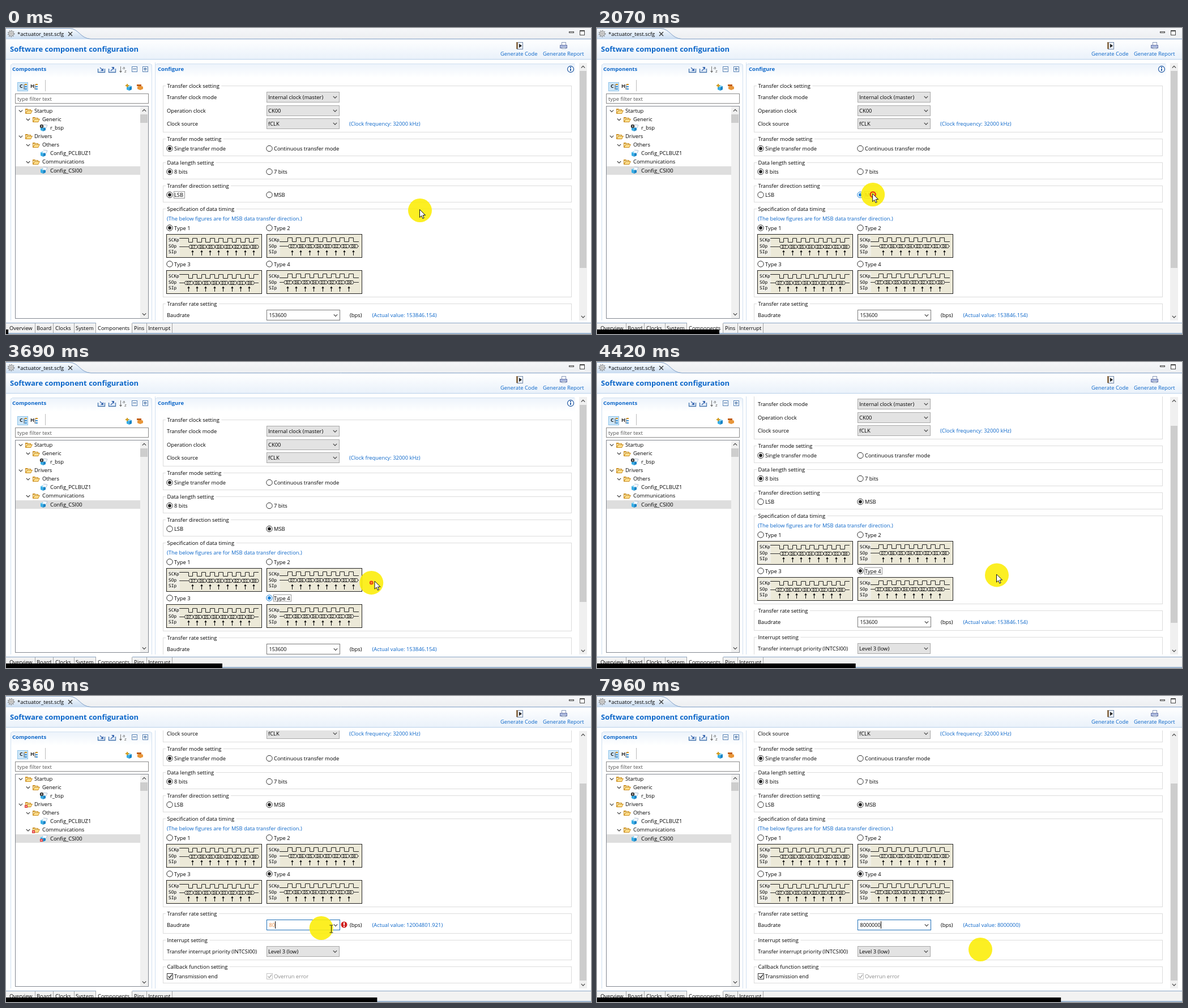
Write an HTML page with a canvas that moves like this. It is 1033 by 542 pixels and loops after 8 s.

```html
<!DOCTYPE html>
<html lang="en">
<head>
<meta charset="utf-8">
<title>Software component configuration</title>
<style>
html, body { margin: 0; width: 100%; height: 100%; overflow: hidden; background: #fff; }
canvas { display: block; }
</style>
</head>
<body>
<canvas id="stage" width="1033" height="542"></canvas>
<script>
const g = document.getElementById('stage').getContext('2d');
const LOOP = 8000, SCROLL = 103;
const SANS = '"Open Sans", "Noto Sans", sans-serif';
const MONO = '"DejaVu Sans Mono", monospace';
const BLUE = '#0b66c9', INK = '#000';

// Pointer path: time, x, y
const PATH = [
  [0, 731, 323], [400, 731, 323], [840, 712, 308], [1040, 597, 292], [1100, 560, 291],
  [1300, 522, 292], [1680, 515, 296], [1740, 488, 295], [2150, 487, 295], [2500, 506, 311],
  [2900, 500, 380], [3250, 487, 418], [3420, 488, 418], [3560, 560, 405], [3690, 645, 391],
  [3730, 655, 389], [3950, 706, 376], [4600, 706, 378], [5010, 578, 400], [5090, 509, 405],
  [5230, 509, 405], [5450, 447, 406], [6200, 460, 409], [6360, 556, 411], [6400, 584, 412],
  [6500, 610, 412], [6680, 612, 412], [7000, 677, 449]
];
const PRESSES = [[1740, 1830], [3320, 3410], [5090, 5500]];
const KEYS = [6050, 6280, 6600, 6760, 6900, 7040, 7190];

function pointer(t) {
  const i = PATH.findIndex(p => p[0] > t);
  if (i < 0) return PATH[PATH.length - 1].slice(1);
  const [t0, x0, y0] = PATH[i - 1], [t1, x1, y1] = PATH[i];
  const k = (t - t0) / (t1 - t0);
  return [x0 + (x1 - x0) * k, y0 + (y1 - y0) * k];
}

function text(s, x, yc, color = INK, size = 9.4, weight = 400, family = SANS) {
  g.font = `${weight} ${size}px ${family}`;
  g.fillStyle = color;
  g.fillText(s, x, yc + size * 0.355);
}
function rect(x, y, w, h, fill, stroke) {
  if (fill) { g.fillStyle = fill; g.fillRect(x, y, w, h); }
  if (stroke) { g.strokeStyle = stroke; g.lineWidth = 1; g.strokeRect(x + .5, y + .5, w - 1, h - 1); }
}
function line(color, width, ...pts) {
  g.strokeStyle = color;
  g.lineWidth = width;
  g.beginPath();
  for (let i = 0; i < pts.length; i += 2) g.lineTo(pts[i], pts[i + 1]);
  g.stroke();
}
function poly(fill, ...pts) {
  g.fillStyle = fill;
  g.beginPath();
  for (let i = 0; i < pts.length; i += 2) g.lineTo(pts[i], pts[i + 1]);
  g.closePath();
  g.fill();
}
function disc(x, y, r, fill, stroke, width = 1) {
  g.beginPath();
  g.arc(x, y, r, 0, 7);
  if (fill) { g.fillStyle = fill; g.fill(); }
  if (stroke) { g.strokeStyle = stroke; g.lineWidth = width; g.stroke(); }
}
function fade(x, y, w, h, from, to) {
  const f = g.createLinearGradient(0, y, 0, y + h);
  f.addColorStop(0, from);
  f.addColorStop(1, to);
  rect(x, y, w, h, f);
}
function chevron(x, y, d = 1, color = '#444', s = 3.2) {
  line(color, 1.2, x - s, y - d * s / 2, x, y + d * s / 2, x + s, y - d * s / 2);
}
function dotted(x, y, w, h) {
  g.setLineDash([1, 1]);
  rect(x, y, w, h, null, '#333');
  g.setLineDash([]);
}

function frame() {
  rect(0, 0, 1033, 542, '#fff');
  fade(0, 0, 1033, 19, '#f6f7f9', '#eceef1');
  // editor tab
  const f = g.createLinearGradient(0, 0, 0, 20);
  f.addColorStop(0, '#fdfeff');
  f.addColorStop(1, '#c9dcf1');
  g.beginPath();
  g.moveTo(0, 20); g.lineTo(0, 1); g.lineTo(112, 1);
  g.bezierCurveTo(130, 2, 130, 18, 150, 19.5);
  g.lineTo(150, 20);
  g.fillStyle = f; g.fill();
  g.beginPath();
  g.moveTo(0, .5); g.lineTo(112, .5);
  g.bezierCurveTo(130, 2, 130, 18, 150, 19.5);
  g.lineTo(1033, 19.5);
  g.strokeStyle = '#7f9fc6'; g.lineWidth = 1; g.stroke();
  disc(9, 10, 4, '#e8e8e8', '#888', 1.2);
  g.setLineDash([1.8, 1.9]);
  disc(9, 10, 5.6, null, '#888', 1.4);
  g.setLineDash([]);
  disc(9, 10, 1.5, '#fff', '#888');
  text('*actuator_test.scfg', 20, 10.5);
  line('#333', 1.2, 110, 7, 117, 14);
  line('#333', 1.2, 117, 7, 110, 14);
  rect(994, 6, 9, 3, '#fff', '#444');
  rect(1013, 4, 9, 9, '#fff', '#444');
  rect(1013, 4, 9, 2, '#444');

  // title band
  fade(0, 20, 1033, 36, '#ffffff', '#e9f1fa');
  rect(0, 55, 1033, 1, '#b9d1ea');
  text('Software component configuration', 7, 37, BLUE, 13, 700);
  text('Generate Code', 873, 45.5, BLUE);
  text('Generate Report', 948, 45.5, BLUE);
  rect(902, 25, 11, 13, '#eef3fa', '#7186a6');
  rect(901, 25, 3, 12, '#8b6f4e');
  poly('#222', 906, 28, 911, 31.5, 906, 35);
  rect(981, 25, 8, 6, '#fff', '#8797b8');
  rect(978, 30, 13, 6, '#aebbe0', '#6674a8');
  rect(981, 34, 8, 3, '#fff', '#8797b8');

  // bottom tabs
  rect(0, 518, 1033, 24, '#fff');
  rect(0, 522, 1033, 18, '#f2f2f2');
  rect(0, 522, 1033, 1, '#8aa6c6');
  rect(0, 540, 1033, 2, '#9db6d2');
  rect(159, 522, 64, 18, '#fff');
  const tabs = [['Overview', 6, 51], ['Board', 54, 83], ['Clocks', 87, 120], ['System', 123, 158],
    ['Components', 162, 222], ['Pins', 226, 248], ['Interrupt', 251, 293]];
  for (const [s, x, end] of tabs) {
    text(s, x, 531.5);
    rect(end, 523, 1, 17, '#a5a5a5');
  }
}

function folder(x, y, bad) {
  poly('#c98c1e', x, y - 4, x + 4, y - 4, x + 5, y - 3, x + 10, y - 3, x + 10, y + 4, x, y + 4);
  poly('#fff3c4', x + 1, y - 2, x + 9, y - 2, x + 9, y + 3, x + 1, y + 3);
  poly('#c98c1e', x, y + 5, x + 3, y - 1, x + 13, y - 1, x + 10, y + 5);
  poly('#ffdf8c', x + 1.6, y + 4, x + 3.7, y, x + 11.5, y, x + 9.5, y + 4);
  if (bad) badge(x, y);
}
function badge(x, y) {
  rect(x - 1, y + 1, 5, 5, '#dd2b2b');
  line('#fff', .9, x, y + 2, x + 3, y + 5);
  line('#fff', .9, x + 3, y + 2, x, y + 5);
}
function cube(x, y) {
  poly('#8fd6f5', x + 1, y - 2, x + 5.5, y - 4, x + 10, y - 2, x + 5.5, y);
  poly('#35ade6', x + 1, y - 2, x + 5.5, y, x + 5.5, y + 6, x + 1, y + 4);
  poly('#1583c6', x + 10, y - 2, x + 5.5, y, x + 5.5, y + 6, x + 10, y + 4);
}
function leaf(x, y) {
  cube(x, y);
  poly('#f4f7fb', x + 6, y - 6, x + 13, y - 5, x + 11, y, x + 5, y - 1);
  line('#9aaec4', .7, x + 6, y - 6, x + 13, y - 5, x + 11, y);
}

function side(bad) {
  rect(0, 56, 263, 462, '#fff');
  fade(8, 64, 250, 24, '#edf3fb', '#ffffff');
  line('#cfdff0', 1, 8.5, 518, 8.5, 66, 11, 63.5, 255, 63.5, 257.5, 66, 257.5, 518);
  text('Components', 11, 73, BLUE, 9.5, 700);
  for (const [x, d] of [[162, 1], [181, -1]]) {
    rect(x, 73, 13, 6, '#e4edf8');
    line('#4676ae', 1.3, x + .5, 72, x + .5, 78.5, x + 12.5, 78.5, x + 12.5, 72);
    line('#3a68b0', 1.3, x + 4, 73 - d * 3, x + 9, 73 + d * 2);
    if (d > 0) poly('#3a68b0', x + 10, 76, x + 10, 71, x + 5, 76);
    else poly('#3a68b0', x + 10, 69, x + 10, 74, x + 5, 69);
  }
  line('#777', 1, 202.5, 68, 202.5, 78);
  poly('#777', 200, 76, 205, 76, 202.5, 79.5);
  text('a', 206, 70, '#555', 7.5);
  text('z', 209, 76, '#555', 8);
  for (const x of [222, 241]) {
    rect(x, 68, 10, 10, '#f4f9ff', '#5b84b5');
    rect(x + 2, 72, 6, 1, '#2d5c96');
  }
  rect(245, 70, 1, 6, '#2d5c96');

  rect(20, 96, 19, 16, '#cde6f8', '#8cc3ea');
  text('C', 24, 102.5, '#222', 9, 700);
  text('H', 43, 102.5, '#222', 9, 700);
  for (const x of [32, 51]) {
    line('#555', 1, x, 100, x, 109);
    for (let i = 0; i < 3; i++) rect(x + 1, 99 + i * 4, 4, 2, i ? '#3b8fd0' : '#c98c1e');
  }
  rect(69, 92, 1, 20, '#bbb');
  cube(212, 105);
  rect(211, 101, 6, 2, '#d19a1c');
  rect(213, 99, 2, 6, '#d19a1c');
  poly('#e8963a', 232, 104, 237, 102, 242, 104, 242, 108, 237, 110, 232, 108);
  rect(231, 100, 8, 3, '#c35f16');

  rect(16, 116, 236, 18, '#fff', '#8a8a8a');
  text('type filter text', 20, 125.5, '#555');
  rect(16, 138, 236, 377, '#fff', '#828790');
  rect(17, 245, 220, 15, '#dedede');
  rect(237, 139, 14, 375, '#f0f0f0');
  rect(237, 153, 13, 15, '#cdcdcd');
  chevron(244, 146, -1);
  chevron(244, 507);
  const rows = [['Startup', 0], ['Generic', 1], ['r_bsp', 2], ['Drivers', 0, 1], ['Others', 1],
    ['Config_PCLBUZ1', 2], ['Communications', 1, 1], ['Config_CSI00', 2, 1]];
  rows.forEach(([s, depth, marked], i) => {
    const y = 146.5 + i * 15.1, x = 26 + depth * 13;
    text(s, 50 + depth * 14, y);
    if (depth < 2) {
      chevron(x, y + .5);
      folder(x + 8, Math.round(y), marked && bad);
    } else {
      leaf(60, Math.round(y));
      if (marked && bad) badge(61, Math.round(y));
    }
  });
  disc(63, 174, 3.2, '#333');
  rect(62.5, 172, 1, 4, '#fff');
}

function group(s, y, h) {
  rect(277, y, 722, h, null, '#dcdcdc');
  g.font = `9.4px ${SANS}`;
  rect(282, y - 2, g.measureText(s).width + 6, 5, '#fff');
  text(s, 284.5, y + .5);
}
function radio(x, y, s, on, hot, focus) {
  disc(x, y, 5.2, '#fff', hot ? '#1a7fd6' : '#333');
  if (on) disc(x, y, 2.9, hot ? '#1a7fd6' : '#222');
  text(s, x + 8, y + .3);
  if (focus) {
    g.font = `9.4px ${SANS}`;
    dotted(x + 7, y - 6.5, Math.ceil(g.measureText(s).width) + 3, 13);
  }
}
function combo(s, y) {
  rect(460, y - 9, 129, 19, '#e3e3e3', '#a9a9a9');
  text(s, 463, y + .5);
  chevron(581, y + .5);
}
function wave(x, y, idleHigh, early) {
  rect(x, y, 169, 42, '#ece9d8', '#222');
  rect(x + 3, y + 4, 21, 35, '#f0efe8');
  ['SCKp', 'SOp', 'SIp'].forEach((s, i) => text(s, x + 4, y + 10.5 + i * 10.3, INK, 7.8, 400, MONO));
  // active-high figures sit one pixel higher
  const top = idleHigh ? y : y - 1;
  const pitch = 15.4, half = pitch / 2, start = x + (idleHigh ? 39 : 37.5);
  const hi = top + 7.5, lo = top + 14.5, a = idleHigh ? hi : lo, b = idleHigh ? lo : hi;
  const pts = [x + 23, a];
  for (let i = 0; i < 8; i++) {
    const p = Math.floor(start + i * pitch) + .5, q = Math.floor(start + i * pitch + half) + .5;
    pts.push(p, a, p, b, q, b, q, a);
  }
  line('#222', 1, ...pts, x + 163, a);
  const c0 = start - (early ? half : 0) + 1, m = top + 22.5;
  line('#333', 1, x + 23, m, c0, m);
  for (let i = 0; i < 8; i++) {
    const c = c0 + i * pitch, e = c + pitch;
    line('#333', 1, c, m, c + 1.5, m - 3, e - 1.5, m - 3, e, m, e - 1.5, m + 3, c + 1.5, m + 3, c, m);
    text('D' + (7 - i), c + 3.6, m, INK, 6.6, 400, MONO);
    const ax = Math.floor(c + half - 1) + .5;
    line('#111', 1, ax, y + 29, ax, y + 38);
    poly('#111', ax, y + 28.5, ax + 2.3, y + 32, ax - 2.3, y + 32);
  }
  line('#333', 1, c0 + 8 * pitch, m, x + 163, m);
}

function baud(t) {
  const typed = KEYS.filter(k => t >= k).length;
  const bad = t >= KEYS[0] + 60 && t < 7330;
  const active = t >= PRESSES[2][0];
  const value = typed ? '8' + '0'.repeat(typed - 1) : '153600';
  rect(460, 499, 130, 19, '#fff', active ? '#1e6fb8' : '#7a7a7a');
  g.font = `9px ${SANS}`;
  const w = g.measureText(value).width;
  const selected = active && !typed;
  if (selected) rect(464, 502, w + 1, 13, '#0a74d0');
  text(value, 464.5, 508.5, selected ? '#fff' : bad ? '#e8883c' : INK, 9);
  if (typed) rect(Math.round(465 + w), 502, 1, 13, '#000');
  chevron(582, 509);
  if (bad) {
    disc(597, 508, 5.5, '#cf2020');
    rect(596, 504, 2, 5, '#fff');
    rect(596, 510, 2, 2, '#fff');
  }
  text('(bps)', 607, 509);
  const actual = t < KEYS[0] + 60 ? '153846.154' : t < 7330 ? '12004801.921' : '8000000';
  text(`(Actual value: ${actual})`, 646.5, 509, BLUE);
}

function form(t, off) {
  g.save();
  g.beginPath();
  g.rect(258, 61, 775, 457);
  g.clip();
  line('#cfdff0', 1, 263.5, 518, 263.5, 61);
  g.translate(0, -off);
  fade(264, 64, 741, 24, '#edf3fb', '#ffffff');
  line('#cfdff0', 1, 263.5, 90, 263.5, 66, 266, 63.5, 1004, 63.5);
  text('Configure', 268, 73, BLUE, 9.5, 700);
  disc(997, 73, 5.5, '#fff', '#2d62a8', 1.3);
  rect(996, 72, 2, 4, '#2d62a8');
  rect(996, 69, 2, 2, '#2d62a8');

  group('Transfer clock setting', 102, 83);
  text('Transfer clock mode', 284, 123);
  text('Operation clock', 284, 146.5);
  text('Clock source', 284, 170);
  combo('Internal clock (master)', 122);
  combo('CK00', 146);
  combo('fCLK', 169);
  text('(Clock frequency: 32000 kHz)', 606, 170, BLUE);

  group('Transfer mode setting', 196, 31);
  radio(289, 213.5, 'Single transfer mode', true);
  radio(465, 213.5, 'Continuous transfer mode', false);
  group('Data length setting', 238, 30);
  radio(289, 254.5, '8 bits', true);
  radio(465, 254.5, '7 bits', false);

  const msb = t >= 1830, type4 = t >= 3410;
  group('Transfer direction setting', 279, 30);
  radio(289, 295.5, 'LSB', !msb, false, t < 1740);
  radio(465, 295.5, 'MSB', msb, t > 1710 && t < 2400, t >= 1740 && t < 3320);

  group('Specification of data timing', 320, 157);
  text('(The below figures are for MSB data transfer direction.)', 284, 337.5, BLUE);
  radio(289, 354, 'Type 1', !type4);
  radio(465, 354, 'Type 2', false);
  radio(289, 418, 'Type 3', false);
  radio(465, 418, 'Type 4', type4, t > 3230 && t < 3800, t >= 3320 && t < 5090);
  wave(283, 365, true, false);
  wave(460, 365, false, false);
  wave(283, 429, true, true);
  wave(460, 429, false, true);

  group('Transfer rate setting', 488, 36);
  text('Baudrate', 284, 509);
  baud(t);
  group('Interrupt setting', 535, 36);
  text('Transfer interrupt priority (INTCSI00)', 284, 555.5);
  combo('Level 3 (low)', 555);
  group('Callback function setting', 582, 30);
  rect(284, 594, 11, 11, '#fff', '#333');
  line('#222', 1.3, 286.5, 599.5, 289, 602, 293, 596.5);
  text('Transmission end', 297, 599.5);
  rect(460, 594, 11, 11, '#fff', '#c4c4c4');
  line('#aaa', 1.3, 462.5, 599.5, 465, 602, 469, 596.5);
  text('Overrun error', 473, 599.5, '#8a8a8a');
  g.restore();

  rect(1012, 62, 14, 456, '#f0f0f0');
  rect(1013, 76 + Math.round(off * 79 / SCROLL), 12, 349, '#cdcdcd');
  chevron(1019, 69, -1);
  chevron(1019, 511.5);
}

function ringSize(t) {
  for (const [down, up] of PRESSES) {
    if (t >= down && t < up) return Math.min(1, (t - down) / 80);
    if (t >= up && t < up + 330) return 1 - (t - up) / 330;
  }
  return 0;
}
function arrow(x, y) {
  g.beginPath();
  for (const [dx, dy] of [[0, 0], [0, 14], [3.2, 11], [5.4, 16], [7.6, 15], [5.5, 10.2], [10, 10]]) {
    g.lineTo(x + dx, y + dy);
  }
  g.closePath();
  g.fillStyle = '#fff'; g.fill();
  g.strokeStyle = '#111'; g.lineWidth = 1; g.stroke();
}
function beam(x, y) {
  line('#222', 1, x, y - 6, x, y + 6);
  for (const d of [-6.5, 6.5]) line('#222', 1, x - 3, y + d, x + 3, y + d);
}

function mouse(t, off) {
  const [hx, hy] = pointer(t);
  g.globalAlpha = .9;
  disc(hx, hy, 21, '#fcee0c');
  g.globalAlpha = 1;
  const k = ringSize(t);
  if (k > .03) {
    disc(hx, hy, Math.max(1.5, 17 * k), k < .25 ? '#f59a2a' : null, '#ea3b12', Math.min(2.4, 1 + 5 * k));
  }
  if (t > 7040) return;
  const [x, y] = pointer(t + 25);
  const overField = off && x > 460 && x < 576 && y > 396 && y < 415;
  if (overField) beam(Math.round(x) + .5, Math.round(y) + .5);
  else arrow(x - .5, y - 1.5);
}

function draw(t) {
  const off = t < 4400 ? 0 : t < 4480 ? 48 : t < 4560 ? 96 : SCROLL;
  frame();
  side(t >= KEYS[0] + 60 && t < 7600);
  form(t, off);
  mouse(t, off);
  rect(0, 534, 4 + t * .1024, 8, '#000');
}

const begin = performance.now();
function tick() {
  draw((performance.now() - begin) % LOOP);
  requestAnimationFrame(tick);
}
tick();
</script>
</body>
</html>
```
